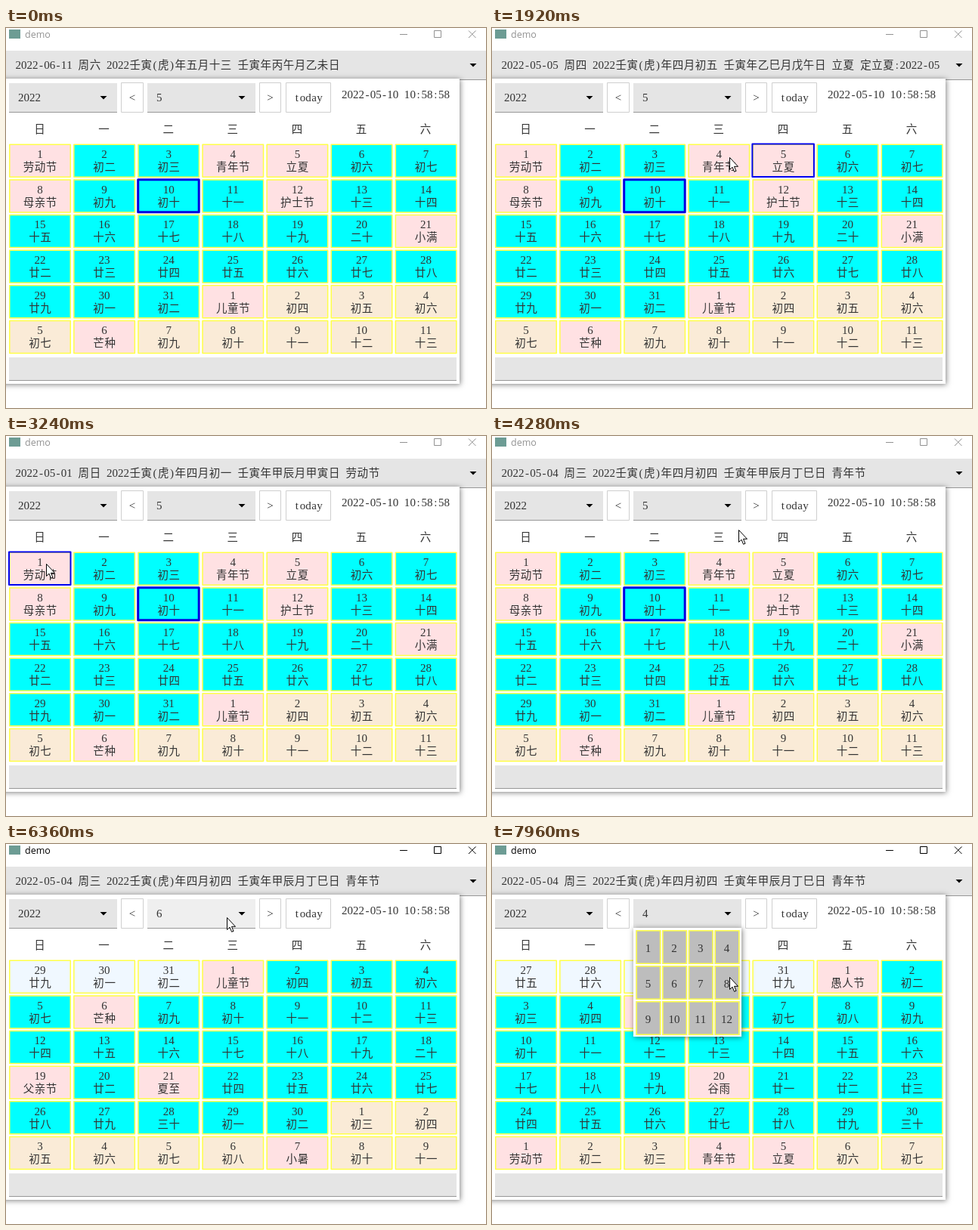
These frames come from a looping animation (635 px wide and 503 px high, 8000 ms). An HTML page with a canvas:

```html
<!DOCTYPE html>
<html lang="zh">
<head>
<meta charset="utf-8">
<title>demo</title>
<style>
html, body { margin: 0; width: 100%; height: 100%; overflow: hidden; background: #fff; }
canvas { display: block; }
</style>
</head>
<body>
<canvas id="stage" width="635" height="503"></canvas>
<script>
const g = document.getElementById('stage').getContext('2d');
const LOOP = 8000, UNIT = 7.53, GREY = '#e5e5e5', INK = '#333', YELLOW = '#ffff48';
const LATIN = '15px "Liberation Serif", serif', HAN = '300 14.5px "Noto Sans CJK SC", sans-serif';

// --- calendar ---
const day = (m, d) => Date.UTC(2022, m - 1, d) / 864e5;
const NUM = '一二三四五六七八九十', STEM = '甲乙丙丁戊己庚辛壬癸', BRANCH = '子丑寅卯辰巳午未申酉戌亥';
const MOONS = [['二', day(3, 3)], ['三', day(4, 1)], ['四', day(5, 1)], ['五', day(5, 30)], ['六', day(6, 29)]];
const FEASTS = {
  '4-1': '愚人节', '4-5': '清明', '4-20': '谷雨', '5-1': '劳动节', '5-4': '青年节', '5-5': '立夏',
  '5-8': '母亲节', '5-12': '护士节', '5-21': '小满', '6-1': '儿童节', '6-6': '芒种',
  '6-19': '父亲节', '6-21': '夏至', '7-7': '小暑'
};

function info(n) {
  const date = new Date(n * 864e5), m = date.getUTCMonth() + 1, d = date.getUTCDate();
  const [moon, first] = MOONS.filter(a => a[1] <= n).pop();
  const k = n - first + 1, digit = NUM[(k - 1) % 10];
  const lunar = k <= 10 ? '初' + digit : k < 20 ? '十' + digit : k === 20 ? '二十' : k < 30 ? '廿' + digit : '三十';
  return { m, d, week: date.getUTCDay(), moon, lunar, feast: FEASTS[m + '-' + d] };
}

function describe(n) {
  const i = info(n), two = v => String(v).padStart(2, '0'), k = n - day(5, 1) + 50;
  const date = `2022-${two(i.m)}-${two(i.d)}`;
  const month = n < day(5, 5) ? '甲辰' : n < day(6, 6) ? '乙巳' : '丙午';
  let s = `${date} 周${'日一二三四五六'[i.week]} 2022壬寅(虎)年${i.moon}月${i.lunar} 壬寅年${month}月${STEM[k % 10]}${BRANCH[k % 12]}日`;
  if (i.feast) s += ' ' + i.feast;
  if (/立夏|小满|芒种/.test(i.feast)) s += ` 定${i.feast}:${date}`;
  return s;
}

const gridStart = m => day(m, 1) - info(day(m, 1)).week;
const cellX = i => 4 + 85.1 * (i % 7);
const cellY = i => 153.5 + 46.65 * Math.floor(i / 7);

// --- pointer: time, x, y ---
const PATH = [
  [320, 511, 492], [960, 388, 358], [1240, 387, 354], [1880, 347, 177], [1920, 314, 171], [2120, 298, 170],
  [2840, 112, 173], [3240, 53, 169], [3440, 53, 169], [3950, 220, 241], [4200, 318, 222], [4280, 326, 124],
  [4600, 348, 94], [5720, 348, 94], [6080, 225, 105], [6360, 292, 97], [6520, 292, 97], [6680, 313, 97],
  [7360, 313, 97], [7960, 314, 176]
];

function pointer(t) {
  const i = PATH.findIndex(p => p[0] > t);
  if (i < 1) return PATH.at(i).slice(1);
  const [t0, x0, y0] = PATH[i - 1], [t1, x1, y1] = PATH[i], k = (t - t0) / (t1 - t0);
  return [x0 + (x1 - x0) * k, y0 + (y1 - y0) * k];
}

function cellAt([x, y]) {
  for (let i = 0; i < 42; i++) {
    const dx = x - cellX(i), dy = y - cellY(i);
    if (dx >= 0 && dx < 82 && dy >= 0 && dy < 44) return i;
  }
  return -1;
}

function lastCell(t) {
  for (let s = t; s > 320; s -= 20) {
    const i = cellAt(pointer(s));
    if (i >= 0) return i;
  }
  return 41;
}

// --- drawing helpers ---
function box(x, y, w, h, fill) { g.fillStyle = fill; g.fillRect(x, y, w, h); }

function frame(x, y, w, h, color, line) {
  g.strokeStyle = color;
  g.lineWidth = line;
  g.lineJoin = 'round';
  g.strokeRect(x + line / 2, y + line / 2, w - line, h - line);
}

function shadowed(x, y, w, h) {
  g.save();
  g.shadowColor = 'rgba(0,0,0,.5)';
  g.shadowBlur = 7;
  g.shadowOffsetX = g.shadowOffsetY = 1;
  box(x, y, w, h, '#fff');
  g.restore();
}

const span = c => c > '\u2000' ? 2 : 1;

// fixed-pitch text: Han takes two units, Latin one
function put(s, x, y) {
  g.fillStyle = INK;
  g.textAlign = 'center';
  for (const c of s) {
    const w = span(c) * UNIT;
    g.font = w > UNIT ? HAN : LATIN;
    g.fillText(c, x + w / 2, y + 5);
    x += w;
  }
}

function center(s, x, y) {
  put(s, x - [...s].reduce((a, c) => a + span(c), 0) * UNIT / 2, y);
}

function poly(points, x, y) {
  g.beginPath();
  points.forEach(([a, b]) => g.lineTo(x + a, y + b));
  g.closePath();
}

function arrow(x, y) {
  poly([[-4.5, -2], [4.5, -2], [0, 2.5]], x, y);
  g.fillStyle = '#000';
  g.fill();
}

function combo(x, y, w, h, fill = GREY) {
  box(x, y, w, h, fill);
  box(x, y + h - 1, w, 1, '#979797');
}

function button(s, x, w, fill = '#fff') {
  box(x, 72, w, 40, fill);
  frame(x, 72, w, 40, '#cfcfcf', 1);
  center(s, x + w / 2, 92);
}

function titleBar(color) {
  box(4, 2, 15, 12, '#6d9c94');
  g.fillStyle = color;
  g.textAlign = 'left';
  g.font = '12.5px "Open Sans", sans-serif';
  g.fillText('demo', 25, 13);
  box(521, 8, 10, 1, color);
  frame(566, 3, 10, 10, color, 1);
  g.beginPath();
  g.moveTo(612, 3.5); g.lineTo(621.5, 13);
  g.moveTo(621.5, 3.5); g.lineTo(612, 13);
  g.stroke();
}

function calendar(month) {
  const start = gridStart(month);
  for (let i = 0; i < 42; i++) {
    const c = info(start + i), x = cellX(i), y = cellY(i);
    const fill = c.feast ? '#ffe1e3' : c.m < month ? '#f0f8ff' : c.m > month ? '#faebd7' : '#0ff';
    box(x + .5, y + .5, 81, 43.5, fill);
    frame(x, y, 82, 44.5, YELLOW, 1.5);
    center(String(c.d), x + 41, y + 13.5);
    center(c.feast || c.lunar, x + 41, y + 30.5);
    if (c.m === 5 && c.d === 10 && month === 5) frame(x - 1, y - 1, 83.5, 46, '#0000e0', 3);
  }
}

function monthList(alpha) {
  g.save();
  g.globalAlpha = alpha;
  shadowed(187, 111, 143, 144);
  for (let i = 0; i < 12; i++) {
    const x = 190.4 + i % 4 * 34.7, y = 114 + Math.floor(i / 4) * 47;
    box(x, y, 33, 45, '#bdbdbd');
    frame(x, y, 33, 45, YELLOW, 1.5);
    center(String(i + 1), x + 16, y + 24);
  }
  g.restore();
}

function cursor(x, y) {
  poly([[.5, .5], [.5, 16.5], [4, 13.2], [6.6, 19.3], [9, 18.3], [6.5, 12.3], [11.5, 12.3]], Math.round(x), Math.round(y));
  g.fillStyle = '#fff';
  g.fill();
  g.strokeStyle = '#000';
  g.lineWidth = 1;
  g.stroke();
}

function draw(t) {
  const [x, y] = pointer(t);
  const month = t < 5080 ? 5 : t < 7640 ? 6 : 4;
  const recent = lastCell(Math.min(t - 40, 4600));

  box(0, 0, 635, 503, '#fff');
  titleBar(t < 4880 ? '#929292' : '#000');

  combo(0, 30, 635, 39);
  g.save();
  g.beginPath();
  g.rect(0, 30, 594, 38);
  g.clip();
  put(describe(gridStart(5) + recent), 12.5, 49);
  g.restore();
  arrow(618, 49);

  shadowed(-10, 67, 610, 404);
  combo(4, 73, 143, 39);
  put('2022', 16, 92);
  arrow(129, 92);
  button('<', 152, 30);
  const over = x > 187 && x < 330 && y > 73 && y < 112 && t < 6960;
  combo(187, 73, 143, 39, over ? '#efefef' : GREY);
  put(String(month), 199, 92);
  arrow(312, 92);
  button('>', 335, 29, t >= 4880 && t < 5200 ? '#dcdcdc' : '#fff');
  button('today', 370, 60);
  put('2022-05-10 10:58:58', 444, 88);

  [...'日一二三四五六'].forEach((s, i) => center(s, cellX(i) + 40.5, 134));
  calendar(month);
  if (t < 4600 && cellAt([x, y]) >= 0 && cellAt(pointer(t - 40)) >= 0)
    frame(cellX(recent) - 1, cellY(recent) - 1, 83.5, 45.5, '#0000f0', 2);
  combo(4, 436, 592, 31);

  if (t >= 6960) monthList(Math.min(1, (t - 6880) / 320));
  if (t >= 320) cursor(x, y);
}

function tick() {
  const t = performance.now() % LOOP;
  draw(Math.floor(t / 40) * 40);
  requestAnimationFrame(tick);
}
tick();
</script>
</body>
</html>
```
